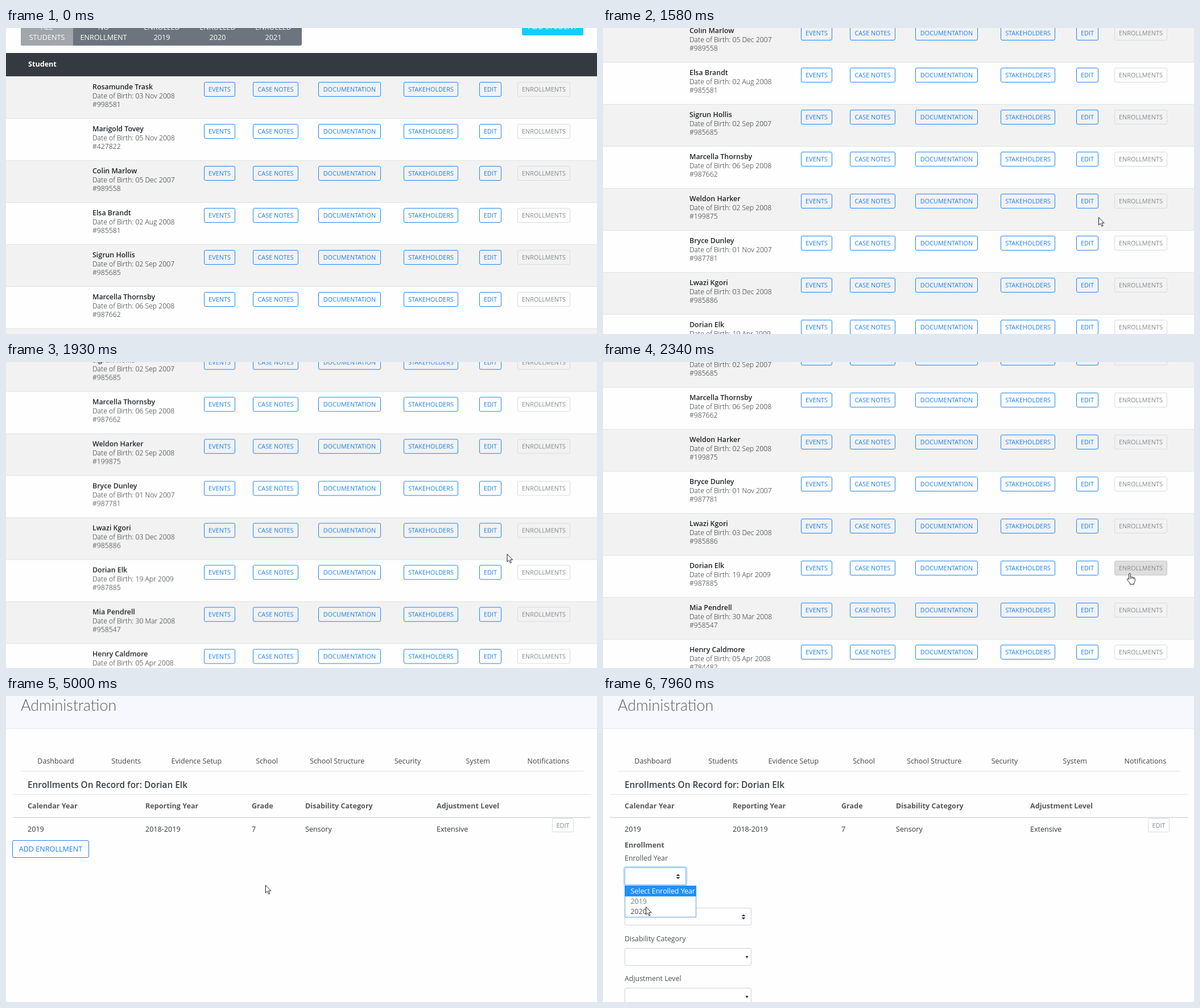
These frames come from a looping animation (1039 by 539 pixels, 8000 ms). An HTML page:

```html
<!DOCTYPE html>
<html lang="en">
<head>
<meta charset="utf-8">
<title>Enrollments</title>
<style>
html, body { margin: 0; width: 100%; height: 100%; overflow: hidden; background: #fefefe; }
body { position: relative; font: 12.5px/20px "Open Sans", "Noto Sans", sans-serif; color: #212529; }
div { position: absolute; box-sizing: border-box; white-space: nowrap; }
svg { position: absolute; overflow: visible; }
#list, #admin { left: 0; top: 0; width: 1039px; }
#list { height: 973px; animation: scroll 8s linear infinite; }
#admin { height: 539px; background: #fefefe; animation: admin 8s step-end infinite; }
.layer { left: 0; top: 0; width: 1039px; height: 539px; }

.row { left: 0; width: 1039px; height: 74px; border-top: 1px solid #dee2e6; }
.row:nth-of-type(odd) { background: #f2f2f2; }
.name { font-size: 12.4px; font-weight: 600; }
.info { font-size: 12.2px; font-weight: 300; }
.btn { border: 1px solid #1a86fb; border-radius: 3px; color: #1a80f0; font-size: 10.9px; text-align: center; }
.pale { border-color: #d9dbdd; color: #84898e; }
.hover { animation: hover 8s linear infinite; }
.tab { color: #fff; font-size: 12.6px; line-height: 18px; text-align: center; }
.mid { text-align: center; color: #444; }
.bold { font-weight: 700; color: #55595d; font-size: 12.6px; }
.cell { font-size: 12.6px; color: #33373b; }
.label { font-size: 12.4px; color: #4c5054; }
.title { font-size: 15.4px; font-weight: 600; color: #3c4044; }
.head { font: 300 26.8px/34px Lato, "Open Sans", sans-serif; color: #5a5e62; }
.select { border: 1px solid #ced4da; border-radius: 3px; background: #fff; }
.add { font-size: 12.6px; animation: add 8s linear infinite; }
.before { animation: before 8s step-end infinite; }
.form { animation: form 8s step-end infinite; }
.open { animation: open 8s step-end infinite; }
.focus { border-color: #80bdff; box-shadow: 0 0 0 2.5px rgba(0, 123, 255, .25); }
#pointer { left: 0; top: 0; width: 0; height: 0; animation: move 8s linear infinite; }
#arrow { animation: arrow 8s step-end infinite; }
#hand { animation: hand 8s step-end infinite; }

@keyframes scroll {
  0%, 9% { transform: translateY(0); animation-timing-function: cubic-bezier(.4, .2, .8, .8); }
  12.5% { transform: translateY(-121px); animation-timing-function: cubic-bezier(.2, .3, .6, 1); }
  15%, 19.75% { transform: translateY(-247px); animation-timing-function: cubic-bezier(.4, .1, .8, .8); }
  21.875% { transform: translateY(-310px); animation-timing-function: cubic-bezier(.2, .3, .5, 1); }
  25%, 100% { transform: translateY(-411px); }
}
@keyframes move {
  0%, 4.125% { transform: translate(880px, 545px); }
  5.375% { transform: translate(847px, 305px); }
  5.625% { transform: translate(843px, 279px); }
  6.375%, 9% { transform: translate(866px, 329px); }
  12.5%, 19.25% { transform: translate(868px, 331px); }
  19.75% { transform: translate(871px, 333px); }
  21.875% { transform: translate(875px, 334px); }
  24.75% { transform: translate(882px, 339px); }
  28%, 57.5% { transform: translate(926px, 372px); }
  60% { transform: translate(740px, 375px); }
  62.5% { transform: translate(457px, 333px); }
  65% { transform: translate(212px, 283px); }
  66.75%, 89.75% { transform: translate(141px, 267px); }
  93.75%, 95% { transform: translate(112px, 318px); }
  99.5%, 100% { transform: translate(75px, 371px); }
}
@keyframes arrow {
  0% { opacity: 1; }
  26.75% { opacity: 0; }
  45.625% { opacity: 1; }
  68% { opacity: 0; }
  77.125%, 100% { opacity: 1; }
}
@keyframes hand {
  0% { opacity: 0; }
  26.75% { opacity: 1; }
  45.625% { opacity: 0; }
  68% { opacity: 1; }
  77.125%, 100% { opacity: 0; }
}
@keyframes hover {
  0%, 26.75% { background-color: rgba(222, 222, 222, 0); border-color: #d9dbdd; }
  28.75%, 100% { background-color: #dedede; border-color: #c8c8c8; }
}
@keyframes add {
  0%, 67.75% { background-color: rgba(0, 123, 255, 0); color: #1a80f0; }
  69.75%, 100% { background-color: #007bff; color: #fff; }
}
@keyframes admin { 0% { opacity: 0; } 44.125%, 100% { opacity: 1; } }
@keyframes before { 0% { opacity: 1; } 76.625%, 100% { opacity: 0; } }
@keyframes form { 0% { opacity: 0; } 76.625%, 100% { opacity: 1; } }
@keyframes open { 0% { opacity: 0; } 94.5%, 100% { opacity: 1; } }
</style>
</head>
<body>
<div id="list"></div>
<div id="admin"></div>
<div id="pointer">
  <svg id="arrow" width="11" height="17"><path d="M.5 .5V14L3.6 11.2L5.9 16.2L8 15.3L5.8 10.3H10Z" fill="#fff" stroke="#222" stroke-linejoin="round"/></svg>
  <svg id="hand" width="15" height="20"><path d="M-1.5 11V1.8Q-1.5 .4 -.1 .4T1.3 1.8V6.8Q2.6 5.7 4 7.2Q5.4 6.3 6.6 7.9Q9.2 7.2 9.2 9.9V13.4Q9.2 15.6 7.6 17.2V19.4H.2V17.4Q-1.4 15.9 -4.4 11.4Q-4.8 9.6 -3.2 9.4Q-2.3 9.8 -1.5 11ZM1.3 6.8V10M4 7.2V10.2M6.6 7.9V10.6" fill="#fff" stroke="#222" stroke-linejoin="round"/></svg>
</div>
<script>
const $ = id => document.getElementById(id);

function box(parent, cls, x, y, w, h, style = '') {
  const el = document.createElement('div');
  el.className = cls;
  el.style.cssText = `left:${x}px;top:${y}px;width:${w}px;height:${h}px;${style}`;
  parent.append(el);
  return el;
}

// Text whose line is centred on y.
function text(parent, cls, x, y, str, h = 20) {
  const el = document.createElement('div');
  el.className = cls;
  el.style.cssText = `left:${x}px;top:${y - h / 2}px`;
  el.textContent = str;
  parent.append(el);
}

function mid(parent, cls, x, y, str) {
  box(parent, cls, x - 70, y - 10, 140, 20).textContent = str;
}

function button(parent, cls, x, y, w, h, str) {
  const el = box(parent, 'btn ' + cls, x, y, w, h, `line-height:${h - 2}px`);
  el.textContent = str;
}

function layer(parent, cls) {
  const el = document.createElement('div');
  el.className = 'layer ' + cls;
  parent.append(el);
  return el;
}

const students = [
  ['Rosamunde Trask', '03 Nov 2008', 998581],
  ['Marigold Tovey', '05 Nov 2008', 427822],
  ['Colin Marlow', '05 Dec 2007', 989558],
  ['Elsa Brandt', '02 Aug 2008', 985581],
  ['Sigrun Hollis', '02 Sep 2007', 985685],
  ['Marcella Thornsby', '06 Sep 2008', 987662],
  ['Weldon Harker', '02 Sep 2008', 199875],
  ['Bryce Dunley', '01 Nov 2007', 987781],
  ['Lwazi Kgori', '03 Dec 2008', 985886],
  ['Dorian Elk', '19 Apr 2009', 987885],
  ['Mia Pendrell', '30 Mar 2008', 958547],
  ['Henry Caldmore', '05 Apr 2008', 784482]
];
const chosen = 9;
const actions = [
  ['EVENTS', 348, 55], ['CASE NOTES', 434, 80], ['DOCUMENTATION', 549, 110],
  ['STAKEHOLDERS', 699, 96], ['EDIT', 832, 39]
];

function buildList(page) {
  const rows = box(page, '', 0, 85, 1039, 888);
  students.forEach(([name, born, id], i) => {
    const row = box(rows, 'row', 0, 74 * i, 1039, 74);
    text(row, 'name', 152, 18, name);
    text(row, 'info', 152, 33.5, 'Date of Birth: ' + born);
    text(row, 'info', 152, 49, '#' + id);
    for (const [label, x, w] of actions) button(row, '', x, 9, w, 26, label);
    button(row, i === chosen ? 'pale hover' : 'pale', 899, 9, 93, 26, 'ENROLLMENTS');
  });

  box(page, '', 0, 44, 1039, 41, 'background:#343a40');
  text(page, 'bold', 39, 64, 'Student');
  page.lastChild.style.color = '#fff';

  box(page, '', 26, -20, 494, 51, 'background:#6c757d;border-radius:3px');
  box(page, '', 26, -20, 92, 51, 'background:#a1a6ab;border-radius:3px 0 0 3px');
  const tabs = [['ALL', 'STUDENTS', 72], ['NO', 'ENROLLMENT', 171.5],
    ['ENROLLED', '2019', 274], ['ENROLLED', '2020', 372], ['ENROLLED', '2021', 470]];
  for (const [top, low, x] of tabs) {
    mid(page, 'tab', x, 0, top);
    mid(page, 'tab', x, 18, low);
  }
  box(page, '', 907, -18, 108, 31, 'background:#14cdff;border-radius:3px');
  mid(page, 'tab', 961, -1, 'ADD STUDENT');
}

const heads = ['Calendar Year', 'Reporting Year', 'Grade', 'Disability Category', 'Adjustment Level'];
const values = ['2019', '2018-2019', '7', 'Sensory', 'Extensive'];

function table(parent, xs, editX) {
  xs.forEach((x, i) => {
    text(parent, 'bold', x, 193.5, heads[i]);
    text(parent, 'cell', x, 234.5, values[i]);
  });
  button(parent, 'pale', editX, 215, 38, 25, 'EDIT');
}

function select(parent, y, w, double) {
  const el = box(parent, 'select', 38, y, w, 31);
  const x = double ? w - 15 : w - 9;
  const d = double ? 'M-3.5 -1L0 -4.5L3.5 -1ZM-3.5 1L0 4.5L3.5 1Z' : 'M-2.5 -2H2.5L0 2.5Z';
  el.innerHTML = `<svg style="left:${x}px;top:15px" width="1" height="1"><path d="${d}" fill="#343a40"/></svg>`;
}

function buildAdmin(page) {
  box(page, '', 0, 0, 1039, 58, 'background:#f7f8fd;border-bottom:1px solid #e7eaf1');
  text(page, 'head', 26, 16, 'Administration', 34);
  ['Dashboard', 'Students', 'Evidence Setup', 'School', 'School Structure',
    'Security', 'System', 'Notifications'].forEach((s, i) => mid(page, 'mid', 87.5 + 123.7 * i, 114.5, s));
  box(page, '', 26, 132, 989, 1, 'background:#e1e4e8');
  text(page, 'title', 38, 157, 'Enrollments On Record for: ' + students[chosen][0]);
  box(page, '', 12, 173, 1016, 1, 'background:#e1e4e8');
  box(page, '', 12, 212.5, 1016, 2, 'background:#dee2e6');

  const before = layer(page, 'before');
  table(before, [38, 245, 432, 526, 757], 960);
  button(before, 'add', 11, 254, 135, 31, 'ADD ENROLLMENT');

  const form = layer(page, 'form');
  table(form, [38, 228, 419, 515, 751], 958);
  text(form, 'bold', 38, 262.5, 'Enrollment');
  ['Enrolled Year', 'Grade', 'Disability Category', 'Adjustment Level'].forEach((s, i) => {
    const y = Math.round(302 + 70.8 * i);
    text(form, 'label', 38, y - 16, s);
    select(form, y, i ? 223 : 108, i < 2);
  });

  const open = layer(form, 'open');
  select(open, 302, 108, true);
  open.lastChild.classList.add('focus');
  box(open, '', 38, 333.5, 126, 56, 'background:#fff;border:1px solid #6f9fdc');
  box(open, '', 38, 334, 126, 19, 'background:#1e90ff');
  ['Select Enrolled Year', '2019', '2020'].forEach((s, i) => {
    text(open, 'label', 48.5, 343.5 + 18.2 * i, s);
    open.lastChild.style.color = ['#fff', '#7a7e82', '#4c5054'][i];
  });
}

buildList($('list'));
buildAdmin($('admin'));
</script>
</body>
</html>
```
